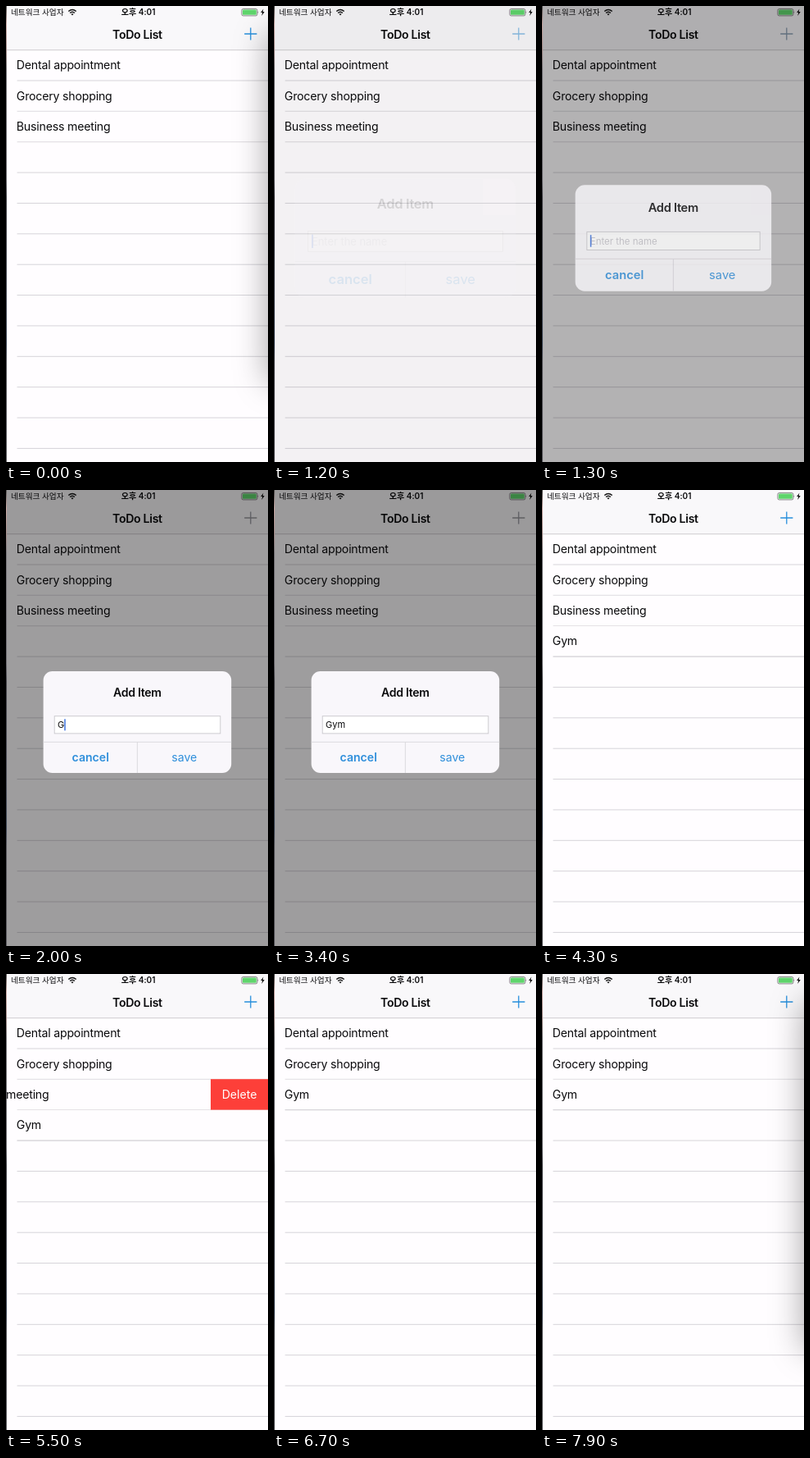
Write an HTML page that moves like this. It is 320 by 556 pixels and loops after 8 s.

```html
<!DOCTYPE html>
<html lang="ko">
<head>
<meta charset="utf-8">
<title>ToDo List</title>
<style>
html, body { margin: 0; width: 100%; height: 100%; overflow: hidden; background: #fffdff; }
#stage { position: relative; width: 320px; height: 556px; overflow: hidden; }
svg { position: absolute; left: 0; top: 0; display: block; }
text { font: 14.1px Inter, "Noto Sans CJK KR", "Noto Sans CJK", sans-serif; letter-spacing: -.18px; fill: #0a0a0c; white-space: pre; }
.bold { font-weight: 600; letter-spacing: -.3px; }
.mid { text-anchor: middle; }
.status { font-size: 9.6px; letter-spacing: 0; }
.blue { fill: #2f8fdb; letter-spacing: 0; }
.field { font-size: 11px; letter-spacing: 0; }
.line { stroke: #d6d4d9; fill: none; }
#shadow { position: absolute; left: 320px; top: 34px; width: 60px; height: 424px; box-shadow: 0 0 40px rgba(0, 0, 0, .36); }
</style>
</head>
<body>
<div id="stage">
<svg width="320" height="556" viewBox="0 0 320 556">
  <defs>
    <linearGradient id="edge" x2="0" y2="1">
      <stop offset="0" stop-color="#555"/><stop offset=".04" stop-color="#c9a9a5"/>
      <stop offset=".1" stop-color="#a08a88"/><stop offset=".14" stop-color="#77757a"/>
      <stop offset=".38" stop-color="#6c6a70"/><stop offset=".42" stop-color="#45444a"/>
      <stop offset=".64" stop-color="#4a4d58"/><stop offset=".74" stop-color="#3c4656"/>
      <stop offset=".78" stop-color="#55545a"/><stop offset="1" stop-color="#5c5b60"/>
    </linearGradient>
  </defs>
  <rect width="320" height="556" fill="#fffdff"/>
  <g id="rules" class="line"></g>
  <text x="12.8" y="77.2">Dental appointment</text>
  <text x="12.8" y="114.6">Grocery shopping</text>
  <g id="meeting">
    <rect y="128.8" width="320" height="36.4" fill="#fffdff"/>
    <g id="meetingCell">
      <text x="12.8" y="152">Business meeting</text>
    </g>
    <g id="del">
      <rect x="320" y="128.2" width="80" height="37.4" fill="#fd3f39"/>
      <text class="mid" x="355" y="152" style="fill:#fff;letter-spacing:0">Delete</text>
    </g>
  </g>
  <g id="gym">
    <rect y="166.1" width="320" height="36.4" fill="#fffdff"/>
    <path class="line" d="M13.5 203H320"/>
    <text x="12.8" y="189.3">Gym</text>
  </g>

  <rect width="320" height="53.5" fill="#f9f8fa"/>
  <path d="M0 53.7H320" stroke="#c3c1c5" stroke-width=".8"/>
  <text class="status" x="6" y="11.3">네트워크 사업자</text>
  <g fill="none" stroke="#111" stroke-width="1.4">
    <path d="M76.3 6.6Q81 2.2 85.7 6.6M78.1 8.6Q81 5.9 83.9 8.6"/>
    <path d="M81 11.6l-1.6-1.8q1.6-1.3 3.2 0z" fill="#111" stroke="none"/>
  </g>
  <text class="status bold mid" x="161.6" y="11.4" style="font-size:10px;letter-spacing:0">오후 4:01</text>
  <rect x="287.9" y="3.5" width="19" height="8.4" rx="1.8" fill="none" stroke="#555" stroke-width=".7"/>
  <rect x="289" y="4.6" width="16.8" height="6.2" rx=".9" fill="#5fd56c"/>
  <path d="M307.6 6.3q1.3 1.4 0 2.8z" fill="#444"/>
  <path d="M314.4 3.6l-3.3 4.5h2l-.8 3.8 3.4-4.8h-2.1z" fill="#111"/>
  <text class="bold mid" x="160.4" y="40">ToDo List</text>
  <path id="plus" d="M291.2 34H306.4M298.8 26.4V41.6" stroke-width="1.3"/>

  <rect id="dim" width="320" height="556"/>
  <g id="alert">
    <rect x="45.6" y="221" width="229.6" height="124" rx="11" fill="#f9f7fb"/>
    <text class="bold mid" x="160.3" y="252">Add Item</text>
    <rect x="59.2" y="275.7" width="202.6" height="21.2" fill="#fff" stroke="#c8c6cb" stroke-width=".9"/>
    <text id="hint" class="field" x="63" y="290.4" style="fill:#c4c3c9">Enter the name</text>
    <text id="typed" class="field" x="63" y="290.4"></text>
    <rect id="caret" y="279.3" width="1.5" height="14" fill="#3f74e0"/>
    <path d="M45.6 307.3H275.2M160.4 307.3V345" stroke="#d9d7dc" stroke-width=".9"/>
    <text class="bold blue mid" x="103.2" y="331" style="letter-spacing:0">cancel</text>
    <text class="blue mid" x="217.8" y="331">save</text>
  </g>
</svg>
<div id="shadow"></div>
<svg width="1" height="556"><rect width="1" height="556" fill="url(#edge)"/></svg>
</div>
<script>
const LOOP = 8000, ROW = 37.37, TOP = 53.6;
const PRESS = 1000, OPEN = 1174, CLOSE = 3533, ADDED = 3940;
const KEYS = [1900, 2200, 2450];
const $ = id => document.getElementById(id);
const set = (id, attrs) => { for (const k in attrs) $(id).setAttribute(k, attrs[k]); };
const show = (id, on) => { $(id).style.display = on ? '' : 'none'; };

// critically damped spring, time in ms
const spring = t => t <= 0 ? 0 : 1 - (1 + .0228 * t) * Math.exp(-.0228 * t);
const ease = (t, from, to) => {
  const p = Math.min(1, Math.max(0, (t - from) / (to - from)));
  return p * p * (3 - 2 * p);
};
const mix = (a, b, p) => `rgb(${a.map((v, i) => Math.round(v + (b[i] - v) * p))})`;

let rules = '';
for (let i = 1; i <= 13; i++) rules += `<path d="M13.5 ${(TOP + ROW * i).toFixed(2)}H320"/>`;
$('rules').innerHTML = rules;

function draw(t) {
  const opened = spring(t - OPEN), level = opened * (1 - spring(t - CLOSE));
  const pressed = t >= PRESS && t < CLOSE ? 1 - opened : 0;
  set('dim', { opacity: .38 * level });
  set('plus', {
    stroke: mix([38, 143, 220], [150, 150, 156], t < CLOSE ? opened : 0),
    opacity: 1 - .5 * pressed
  });

  show('alert', level > .002);
  const s = 1.2 - .2 * opened;
  set('alert', { opacity: level, transform: `translate(160.4 283) scale(${s}) translate(-160.4 -283)` });
  const word = 'Gym'.slice(0, KEYS.filter(k => t >= k).length);
  $('typed').textContent = word;
  show('hint', !word);
  show('caret', t < 3000);
  set('caret', { x: 63 + (word && level > .002 ? $('typed').getComputedTextLength() : 0) });

  const swipe = ease(t, 4700, 5300), removed = ease(t, 5900, 6220);
  show('meeting', removed < 1);
  set('meetingCell', { transform: `translate(${-75 * swipe} 0)` });
  set('del', { transform: `translate(${-70 * swipe} 0)` });
  show('gym', t >= ADDED);
  set('gym', { transform: `translate(0 ${-ROW * removed})` });

  show('shadow', t < PRESS || t >= 6800);
}

function tick() {
  draw(performance.now() % LOOP);
  requestAnimationFrame(tick);
}
tick();
</script>
</body>
</html>
```
